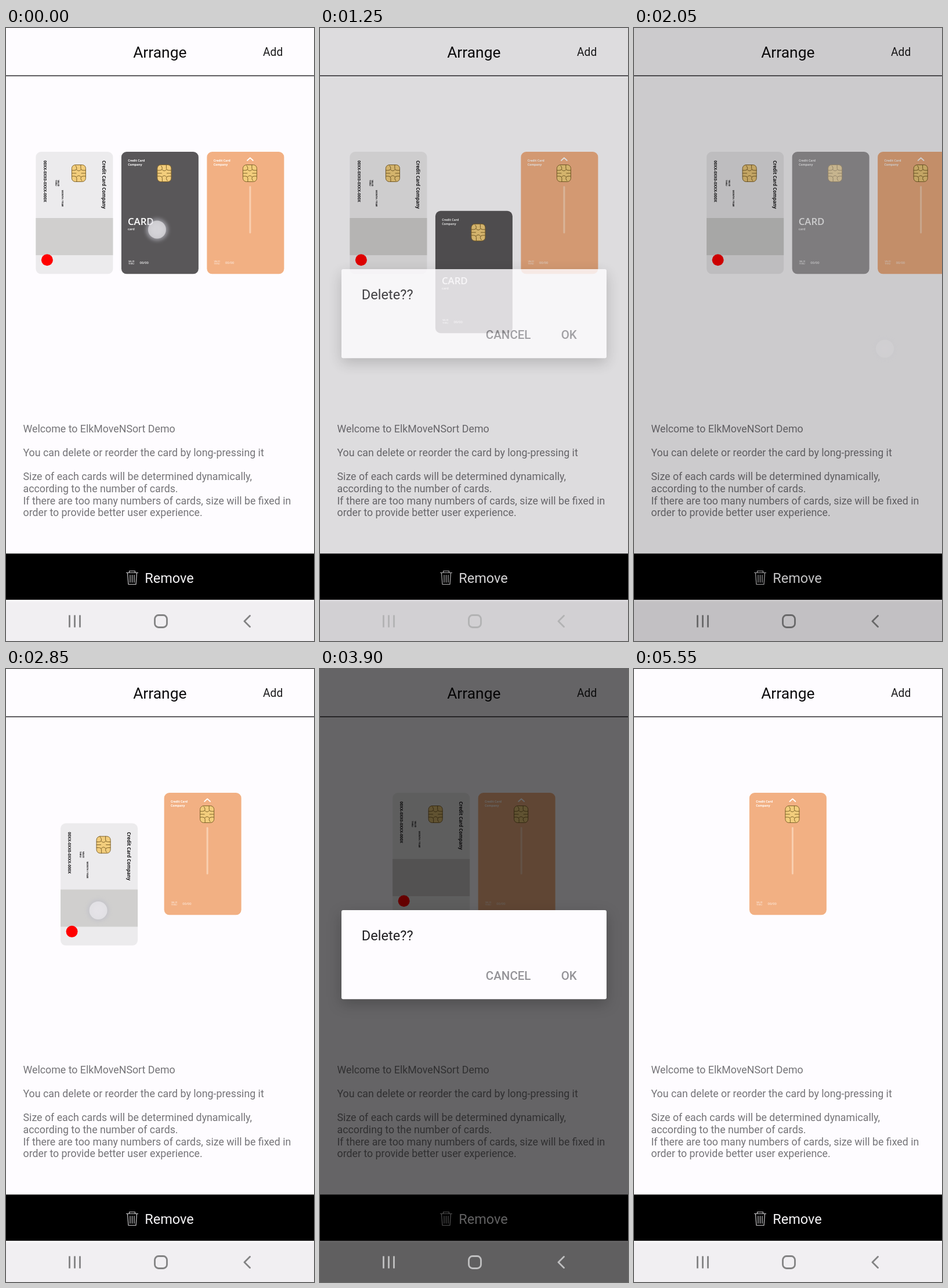
Recreate the animation shown at these times as an HTML page. Size 531 by 1055 pixels, loop 5.6 s.

```html
<!DOCTYPE html>
<html lang="en">
<head>
<meta charset="utf-8">
<title>Card arranging</title>
<style>
  html, body { margin: 0; width: 100%; height: 100%; overflow: hidden; background: #fefcff; }
  svg { display: block; width: 100%; height: 100%; font-family: Roboto, sans-serif; }
  .print { font-family: "Open Sans", "Noto Sans", sans-serif; font-weight: 600; }
  .line { fill: none; stroke-linecap: round; stroke-linejoin: round; }
</style>
</head>
<body>
<svg viewBox="0 0 531 1055">
  <defs>
    <g id="chip" class="line" stroke="#80642c">
      <rect x=".5" y=".5" width="24" height="29" rx="6" fill="#f2cd7c"/>
      <path d="M.5 10H5Q9 10 9 6.500Q9 4 7 2M24.500 10H20Q16 10 16 6.500V.5M9 9Q12.500 13 16 9M.5 15H8M17 15H24.500
               M.5 20H5Q9 20 9 23.500V29.500M24.500 20H20Q16 20 16 23.500Q16 26 18 28M9 21Q12.500 17 16 21"/>
    </g>
  </defs>
  <rect width="531" height="1055" fill="#fefcff"/>
  <text x="265.300" y="50.500" font-size="26.400" text-anchor="middle" fill="#0c0b0d">Arrange</text>
  <text x="443" y="47.800" font-size="19.300" fill="#1c1b1d">Add</text>
  <rect y="81.500" width="531" height="1.500" fill="#2c2b2e"/>
  <g id="notes" font-size="17.800" fill="#757478"></g>
  <g id="cards"></g>

  <rect y="904.500" width="531" height="79.500" fill="#000"/>
  <g class="line" stroke="#c9c8ca" stroke-width="1.200">
    <path d="M207.500 937.500H227.500M212.500 937V934.500H222.500V937M209.500 938L211 957.500H224L225.500 938M214 941.500V954M217.500 941.500V954M221 941.500V954"/>
  </g>
  <text x="239.300" y="954.700" font-size="23.500" fill="#f4f3f5">Remove</text>
  <rect y="984" width="531" height="71" fill="#f1eff2"/>
  <rect y="984" width="531" height="4" fill="#f8f6f9"/>

  <rect id="dim" width="531" height="1055"/>
  <g id="nav" class="line" stroke-width="2.800">
    <path stroke-linecap="butt" d="M109.500 1010.500V1031.500M118.500 1010.500V1031.500M127.500 1010.500V1031.500"/>
    <rect x="256.500" y="1010.500" width="21" height="21" rx="6.500"/>
    <path d="M420.500 1011.500L411 1021L420.500 1030.500"/>
  </g>
  <g id="dialog">
    <rect x="37" y="415" width="457" height="153.200" rx="3" fill="#fefcff" style="filter:drop-shadow(0 8px 12px rgba(0,0,0,.22))"/>
    <text x="71.800" y="466.700" font-size="23.600" fill="#201f22">Delete??</text>
    <g font-size="20.500" font-weight="500" fill="#949397">
      <text x="285.800" y="534.800">CANCEL</text>
      <text x="415.700" y="534.800">OK</text>
    </g>
  </g>
  <g id="finger">
    <circle r="19" fill="#bebec8" opacity=".6" style="filter:blur(3px)"/>
    <circle r="15.500" fill="#f3f2f5" opacity=".6"/>
    <circle r="11" fill="#f3f2f5" opacity=".2" style="filter:blur(3px)"/>
  </g>
</svg>
<script>
const LOOP = 5600, TOP = 213, STEP = 147.5;
const $ = id => document.getElementById(id);
const clamp = v => Math.min(1, Math.max(0, v));
const ramp = (t, start, length) => clamp((t - start) / length);
const ease = u => (1 - Math.cos(Math.PI * u)) / 2;
const mix = (a, b, u) => a + (b - a) * u;
const slot = (index, count) => 198.9 + (index - (count - 1) / 2) * STEP;

// Card artwork, relative to the card's top left corner
const label = (x, y, size, text, extra = '') =>
  `<text x="${x}" y="${y}" font-size="${size}" ${extra}>${text}</text>`;
const sideways = (x, y, size, text) =>
  label(0, 0, size, text, `font-weight="700" transform="translate(${x} ${y}) rotate(90)"`);
const face = color => `<rect width="133" height="210.300" rx="9" fill="${color}"/>`;
const chip = '<use href="#chip" x="61.500" y="22"/>';
const frontText = fade =>
  '<g font-weight="700">' + label(11.3, 17.3, 5.2, 'Credit Card') + label(11.3, 23.8, 5.2, 'Company') + '</g>' +
  `<g opacity="${fade}">` + label(12, 189.5, 3.8, 'VALID') + label(12, 194.3, 3.8, 'THRU') +
  label(31.5, 192.8, 5.8, '00/00') + '</g>';

const art = [
  face('#ecebed') + '<rect y="114" width="133" height="64" fill="#d0cfce"/>' +
    '<circle cx="19.500" cy="186.300" r="10" fill="#f00"/>' + chip + '<g fill="#151416">' +
    sideways(114.5, 15, 7.9, 'Credit Card Company') + sideways(13.3, 15, 6.6, '00XX-0XX0-0XXX-000X') +
    sideways(38, 48.5, 3.8, 'VALID') + sideways(33.2, 48.5, 3.8, 'THRU') +
    sideways(44.8, 66, 3.9, 'MONTH / YEAR') + '</g>',
  face('#595759') + chip + '<g fill="#fff">' + frontText(.9) +
    label(11, 126, 16.8, 'CARD') + label(11, 134.7, 5.6, 'card') + '</g>',
  face('#f2b083') + chip + '<g fill="#fff">' + frontText(.65) + '</g>' +
    '<path class="line" d="M69.500 15L74.500 10.500L79.500 15" stroke="#fff" stroke-width="1.700"/>' +
    '<path class="line" d="M74.500 60.500V139" stroke="#f9cfb0" stroke-width="3"/>'
];
const cards = art.map(markup => {
  $('cards').insertAdjacentHTML('beforeend', `<g class="print">${markup}</g>`);
  return $('cards').lastElementChild;
});
$('cards').prepend(cards[2]);
const [light, dark, orange] = cards;

$('notes').innerHTML = [
  'Welcome to ElkMoveNSort Demo', '',
  'You can delete or reorder the card by long-pressing it', '',
  'Size of each cards will be determined dynamically,', 'according to the number of cards.',
  'If there are too many numbers of cards, size will be fixed in',
  'order to provide better user experience.'
].map((text, i) => `<text x="29.500" y="${696 + i * 20.6}">${text}</text>`).join('');

// Each round: drag a card (time, x, y), let it spring home, confirm, remove
const rounds = [
  { path: [[60, 198.9, 213], [170, 72, 140], [270, 150, 48], [370, 288, 150], [470, 240, 430],
           [600, 194, 720], [720, 192, 790], [850, 196, 821], [1112, 198.9, 821]],
    grip: [61.5, 134], press: -100, release: 1112, back: 190, open: 1202, tap: 1850, close: 1937, remove: 1998 },
  { path: [[2450, 125.15, 213], [2560, 215, 225], [2640, 260, 240], [2740, 165, 250], [2850, 94.5, 264.5],
           [2920, 105, 390], [3000, 150, 553], [3120, 185, 690], [3250, 198, 775], [3421, 198, 778]],
    grip: [65, 150], press: 2390, release: 3421, back: 200, open: 3610, tap: 4350, close: 4427, remove: 4515 }
];

function spline(path, t) {
  const last = path.length - 1;
  if (t <= path[0][0]) return path[0].slice(1);
  if (t >= path[last][0]) return path[last].slice(1);
  const i = path.findIndex(p => p[0] > t) - 1;
  const [a, b, c, d] = [i - 1, i, i + 1, i + 2].map(k => path[Math.min(last, Math.max(0, k))]);
  const u = (t - b[0]) / (c[0] - b[0]);
  return [1, 2].map(k => b[k] + u / 2 * (c[k] - a[k] +
    u * (2 * a[k] - 5 * b[k] + 4 * c[k] - d[k] + u * (3 * (b[k] - c[k]) + d[k] - a[k]))));
}

function draggedPosition(round, t) {
  const [x, y] = spline(round.path, t);
  const home = ease(ramp(t, round.release, round.back));
  return [mix(x, round.path[0][1], home), mix(y, TOP, home)];
}

const fadeOut = (round, t) => 1 - ease(ramp(t, round.remove, 120));
const closeUp = (round, t) => ease(ramp(t, round.remove + 120, 250));

function place(node, x, y = TOP, opacity = 1) {
  node.setAttribute('transform', `translate(${x} ${y})`);
  node.setAttribute('opacity', opacity);
}

function draw(t) {
  const [first, second] = rounds;
  const round = t < 2380 ? first : second;
  const removed = t >= first.remove, removedTwice = t >= second.remove;

  if (removed) place(dark, slot(1, 2), TOP, fadeOut(first, t));
  else place(dark, ...draggedPosition(first, t));

  if (removedTwice) place(light, slot(0, 1), TOP, fadeOut(second, t));
  else if (removed) place(light, ...draggedPosition(second, t));
  else place(light, slot(0, 3));

  if (removedTwice) place(orange, mix(slot(1, 1), slot(0, 1), closeUp(second, t)));
  else if (removed) place(orange, mix(slot(2, 2), slot(1, 2), closeUp(first, t)));
  else place(orange, slot(2, 3));

  const dim = .6 * ramp(t, round.open, 230) * (1 - ramp(t, round.close, 170));
  const shown = ramp(t, round.open, 60) * (1 - ramp(t, round.close, 90));
  $('dim').setAttribute('opacity', dim);
  $('dialog').setAttribute('opacity', shown);
  const shade = mix(130 * (1 - dim), 192, shown);
  $('nav').setAttribute('stroke', `rgb(${shade},${shade},${shade + 1})`);

  if (t < round.tap) {
    const [x, y] = spline(round.path, t);
    const touch = ramp(t, round.press, 60) * (1 - ramp(t, round.release, 80));
    place($('finger'), x + round.grip[0], y + round.grip[1], touch);
  } else {
    place($('finger'), 432.5, 552, ramp(t, round.tap, 50) * (1 - ramp(t, round.close, 140)));
  }
}

const start = performance.now();
function tick() {
  draw((performance.now() - start) % LOOP);
  requestAnimationFrame(tick);
}
tick();
</script>
</body>
</html>
```
